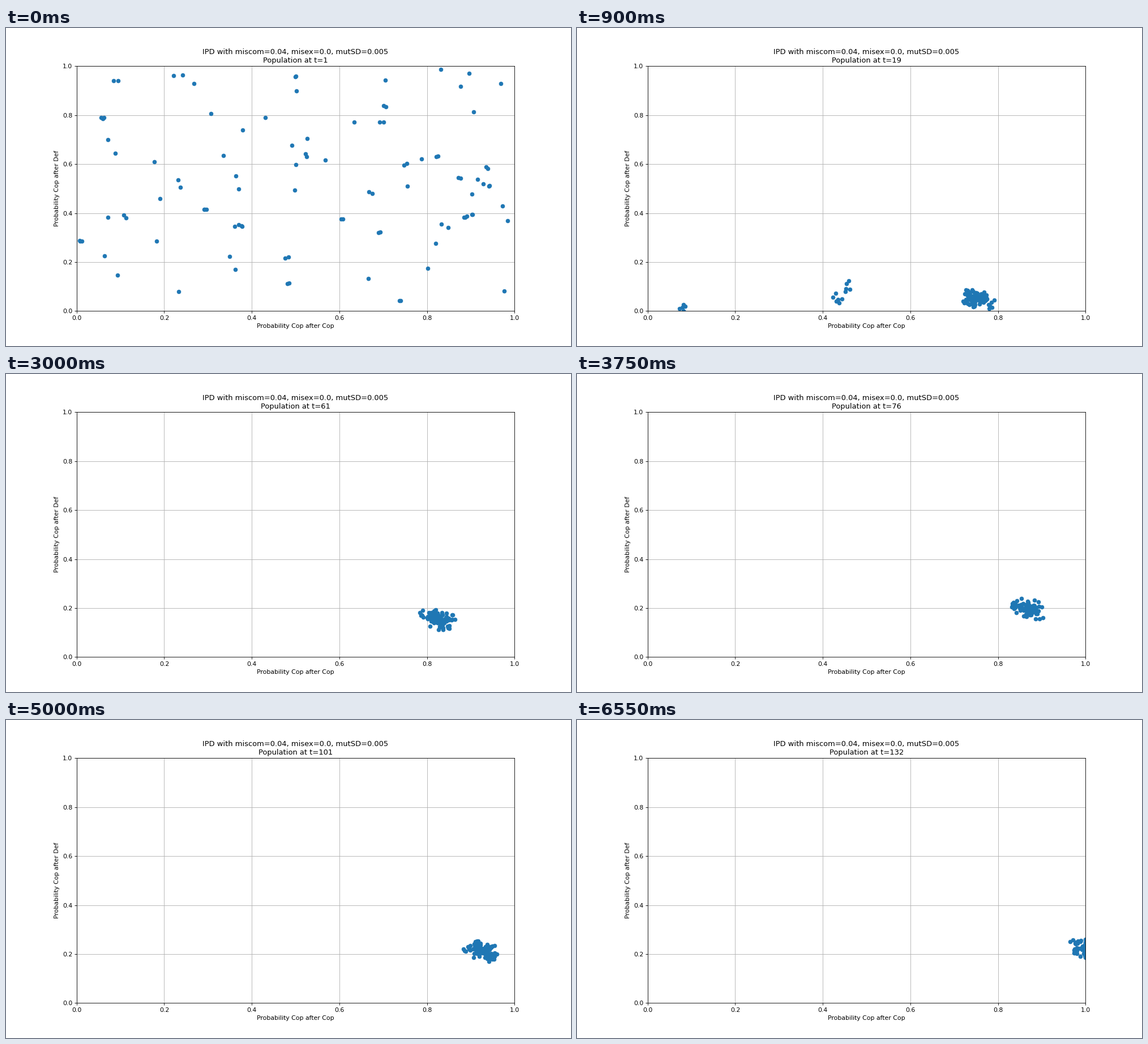
A matplotlib script that plays this animation: 998 px wide and 561 px high, repeating every 6.65 s.

```python
import numpy as np
import matplotlib.pyplot as plt
from matplotlib.animation import FuncAnimation

W, H, DPI = 998, 561, 78
STEPS, SIZE, FOUNDERS = 132, 100, 74
MUT = 0.005
SETTLED = 19  # generation by which all founders have been replaced

# Centre of the winning swarm over time: t, x, y
PATH = np.array([(1, .715, .035), (19, .752, .049), (43, .790, .113),
                 (61, .824, .156), (76, .868, .196), (101, .928, .214),
                 (132, 1.004, .221)]).T

rng = np.random.default_rng(4)


def first_generation():
    """Uniform strategies, some with a slightly mutated sibling."""
    first = rng.random((FOUNDERS, 2))
    kin = first[rng.integers(FOUNDERS, size=SIZE - FOUNDERS)]
    return np.vstack([first, kin + MUT * rng.normal(size=kin.shape)])


def lineage():
    """Unit swarm that is resampled and mutated every generation."""
    z = rng.normal(size=(SIZE, 2))
    out = []
    for _ in range(STEPS + 1):
        copied = rng.random(SIZE) < .15
        parent = np.where(copied, rng.integers(SIZE, size=SIZE),
                          np.arange(SIZE))
        z = z[parent] + .3 * rng.normal(size=z.shape)
        z = (z - z.mean(0)) / z.std(0)
        r = np.hypot(*z.T)[:, None]
        out.append(z * np.minimum(1, 2.6 / r))
    return np.array(out)


founders = first_generation()
swarm = lineage()
walk = np.cumsum(MUT * rng.normal(size=(SETTLED, SIZE, 2)), axis=0)

# Generous strategies are replaced first; two small groups hold out longer
replaced = 2 + 8 * (1 - founders[:, 1]) + 4 * rng.random(SIZE)
left, mid = slice(0, 5), slice(5, 16)
extinct = rng.integers(22, 29, mid.stop)


def cloud(t, centre, sx, sy, tilt=0.0):
    u, v = swarm[t].T
    grow = min(1, t / SETTLED) ** .5
    offset = np.column_stack(
        [sx * u, sy * (tilt * u + np.sqrt(1 - tilt ** 2) * v)])
    return np.asarray(centre) + grow * offset


def population(t):
    centre = [np.interp(t, PATH[0], axis) for axis in PATH[1:]]
    pos = cloud(t, centre, .017, .017, -.25)
    small = np.empty((mid.stop, 2))
    small[left] = cloud(t, (.079, .020), .005, .011)[left]
    small[mid] = cloud(t, (.446, .074), .014, .034, .75)[mid]
    alive = np.flatnonzero(t < extinct)
    pos[alive] = small[alive]
    if t < SETTLED:
        old = t < replaced
        pos[old] = (founders + walk[t - 1] - walk[0])[old]
    return np.clip(pos, 0, 1)


fig, ax = plt.subplots(figsize=(W / DPI, H / DPI), dpi=DPI)
ax.set(xlim=(0, 1), ylim=(0, 1), xlabel="Probability Cop after Cop",
       ylabel="Probability Cop after Def")
ax.grid(True)
dots, = ax.plot([], [], "o", color="C0")


def update(i):
    t = min(i + 1, STEPS)
    dots.set_data(*population(t).T)
    ax.set_title("IPD with miscom=0.04, misex=0.0, mutSD=0.005\n"
                 f"Population at t={t}")
    return dots,


anim = FuncAnimation(fig, update, frames=STEPS + 1, interval=50, repeat=True)
plt.show()
```
